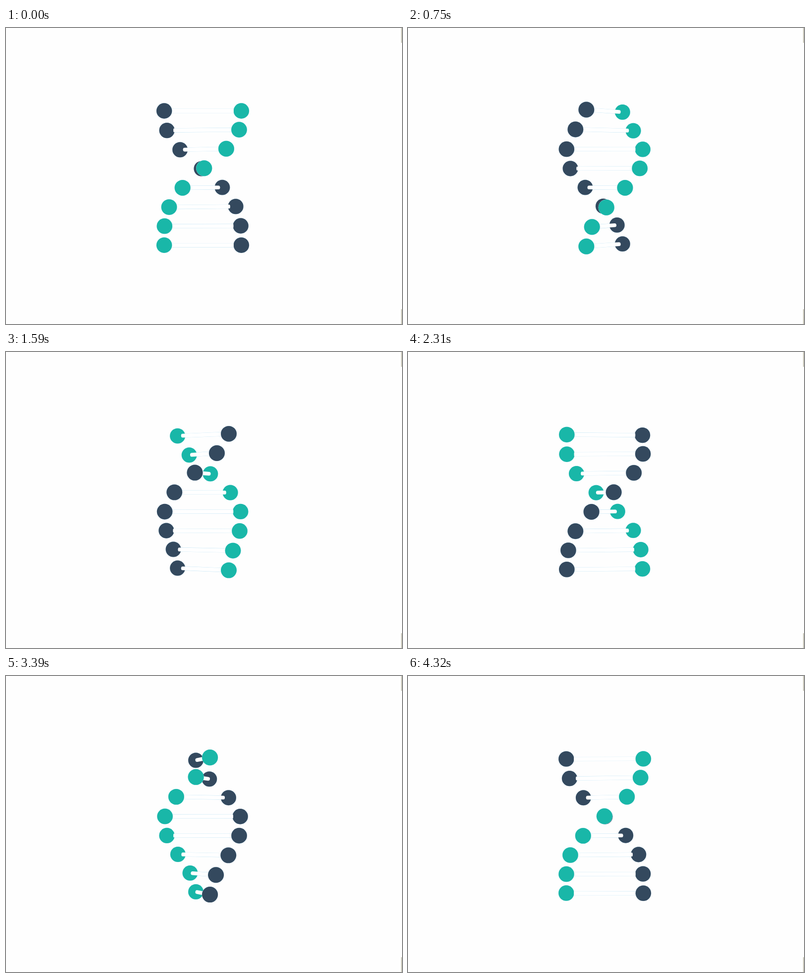
An HTML page with a canvas for the animation above (4350 ms loop, 800 px wide and 600 px high).

```html
<!DOCTYPE html>
<html lang="en">
<head>
<meta charset="utf-8">
<title>Turning helix</title>
<style>
  html, body { margin: 0; width: 800px; height: 600px; overflow: hidden; background: #fefefe; }
  canvas { display: block; }
</style>
</head>
<body>
<canvas id="stage" width="800" height="600"></canvas>
<script>
const ctx = document.getElementById('stage').getContext('2d');

const STEP = 30, STEPS = 145;
const CENTER = { x: 397.5, y: 304.1 };
const ROW_GAP = 38.88;
const RADIUS = 77.9, BALL = 15.7;
const ROD_HALF = 62.4, ROD_RADIUS = 3.9;
const CAMERA = 3700;
const DARK = '#34495e', TEAL = '#19b7a8', ROD = '#ffffff', FRINGE = '#b9e0f3', EDGE = '#cdcbbd';

// Starting angle of each rung's dark ball, in degrees, top to bottom.
const TWIST = [180, 200.6, 233.2, 268, 301, 329.7, 351, 360];

function project(dist, angle, y) {
  const scale = 1 / (1 - dist * Math.sin(angle) / CAMERA);
  return {
    x: CENTER.x + dist * Math.cos(angle) * scale,
    y: CENTER.y + y * scale,
    scale
  };
}

function ball(p, color) {
  for (const [grow, fill] of [[0.2, FRINGE], [0, color]]) {
    ctx.fillStyle = fill;
    ctx.beginPath();
    ctx.arc(p.x, p.y, BALL * p.scale + grow, 0, 2 * Math.PI);
    ctx.fill();
  }
}

// A cylinder seen from the side: a quad with an elliptical disc at each end.
function rod(a, b, grow, color) {
  const dx = b.x - a.x, dy = b.y - a.y;
  const length = Math.hypot(dx, dy);
  const tilt = Math.atan2(dy, dx);
  const depth = Math.sqrt(Math.max(0, 1 - (length / (2 * ROD_HALF)) ** 2));
  const ra = ROD_RADIUS * a.scale + grow, rb = ROD_RADIUS * b.scale + grow;

  ctx.save();
  ctx.translate(a.x, a.y);
  ctx.rotate(tilt);
  ctx.fillStyle = color;
  ctx.beginPath();
  ctx.moveTo(0, -ra);
  ctx.lineTo(length, -rb);
  ctx.ellipse(length, 0, rb * depth, rb, 0, -Math.PI / 2, Math.PI / 2);
  ctx.lineTo(0, ra);
  ctx.ellipse(0, 0, ra * depth, ra, 0, Math.PI / 2, Math.PI * 1.5);
  ctx.fill();
  ctx.restore();
}

function rung(angle, y) {
  const dark = { p: project(RADIUS, angle, y), color: DARK };
  const teal = { p: project(-RADIUS, angle, y), color: TEAL };
  const [back, front] = Math.sin(angle) > 0 ? [teal, dark] : [dark, teal];
  const a = project(-ROD_HALF, angle, y), b = project(ROD_HALF, angle, y);

  rod(a, b, 0.3, FRINGE);
  ball(back.p, back.color);
  rod(a, b, 0, ROD);
  ball(front.p, front.color);
}

function draw(time) {
  const step = Math.floor(time / STEP) % STEPS;
  const turn = step / STEPS * 360;
  ctx.fillStyle = '#fefefe';
  ctx.fillRect(0, 0, 800, 600);
  ctx.fillStyle = EDGE;
  ctx.fillRect(798, 0, 2, 30);
  ctx.fillRect(798, 570, 2, 30);
  TWIST.forEach((start, i) => rung((start - turn) * Math.PI / 180, (i - 3.5) * ROW_GAP));
}

const begin = performance.now();
function tick() {
  draw(performance.now() - begin);
  requestAnimationFrame(tick);
}
tick();
</script>
</body>
</html>
```
